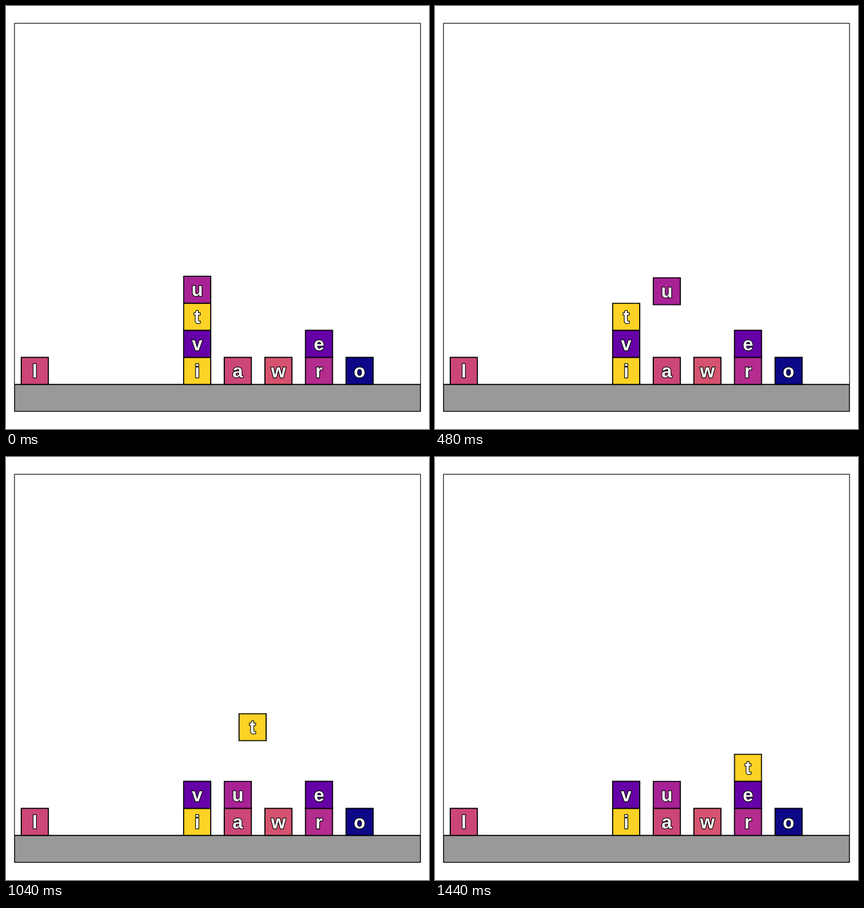
Animation, 748 px wide and 748 px high, one loop 1480 ms. Source, as an HTML page:

```html
<!DOCTYPE html>
<html lang="en">
<head>
<meta charset="utf-8">
<title>Stacking blocks</title>
<style>
  html, body { margin: 0; width: 100%; height: 100%; overflow: hidden; background: #fff; }
  svg { display: block; width: 748px; height: 748px; }
  rect { stroke: #000; stroke-width: 1.9; }
  .frame { fill: none; stroke-width: 1.2; }
  text {
    font: bold 33.3px "Liberation Sans", Arial, sans-serif;
    text-anchor: middle;
    fill: #fff; stroke: #000; stroke-width: 2.4;
    stroke-linejoin: round; paint-order: stroke;
  }
</style>
</head>
<body>
<svg id="stage" viewBox="0 0 748 748">
  <clipPath id="inside"><path d="M15 30.5H733V717H15z"/></clipPath>
  <g clip-path="url(#inside)">
    <rect x="15" y="669.2" width="718" height="47.8" fill="#999"/>
  </g>
  <rect class="frame" x="15" y="30.5" width="718" height="686.4"/>
</svg>
<script>
const NS = 'http://www.w3.org/2000/svg';
const LOOP = 1480, STEP = 40;
const SIZE = 718 / 15, PITCH = SIZE * 1.5, FLOOR = 669.2;
const stage = document.getElementById('stage');

function add(parent, tag, attrs, content = '') {
  const el = document.createElementNS(NS, tag);
  for (const key in attrs) el.setAttribute(key, attrs[key]);
  el.textContent = content;
  return parent.appendChild(el);
}

const place = (col, row) =>
  `translate(${15 + SIZE / 4 + col * PITCH}px, ${FLOOR - (row + 1) * SIZE}px)`;

function block(letter, fill, col, row) {
  const g = add(stage, 'g', {});
  g.style.transform = place(col, row);
  add(g, 'rect', { width: SIZE, height: SIZE, fill });
  add(g, 'text', { x: SIZE / 2, y: SIZE / 2 + 11.5 }, letter);
  return g;
}

// Each leg is [column, row, number of steps]; a leg's first step shows at once.
function move(el, start, col, row, legs) {
  let time = start;
  const frames = [{ offset: 0, transform: place(col, row), easing: 'steps(1, end)' }];
  for (const [toCol, toRow, n] of legs) {
    frames.push({
      offset: time / LOOP,
      transform: place(col, row),
      easing: `steps(${n}, start)`
    });
    [col, row] = [toCol, toRow];
    time += n * STEP;
  }
  frames.push({ offset: time / LOOP, transform: place(col, row) });
  if (time < LOOP) frames.push({ offset: 1, transform: place(col, row) });
  // The small lead keeps step edges clear of rounding.
  el.animate(frames, { duration: LOOP, iterations: Infinity, delay: -0.5 });
}

block('l', '#cc4678', 0, 0);
block('i', '#fcd225', 4, 0);
block('v', '#6600a7', 4, 1);
block('a', '#cc4678', 5, 0);
block('w', '#d5536f', 6, 0);
block('r', '#b32c8e', 7, 0);
block('e', '#6600a7', 7, 1);
block('o', '#0d0887', 8, 0);
const t = block('t', '#fcd225', 4, 2);
const u = block('u', '#a82296', 4, 3);

move(u, STEP, 4, 3, [[4, 4.5, 4], [5, 4.5, 4], [5, 1, 9]]);
move(t, 18 * STEP, 4, 2, [[4, 3.5, 4], [7, 3.5, 11], [7, 2, 4]]);
</script>
</body>
</html>
```
